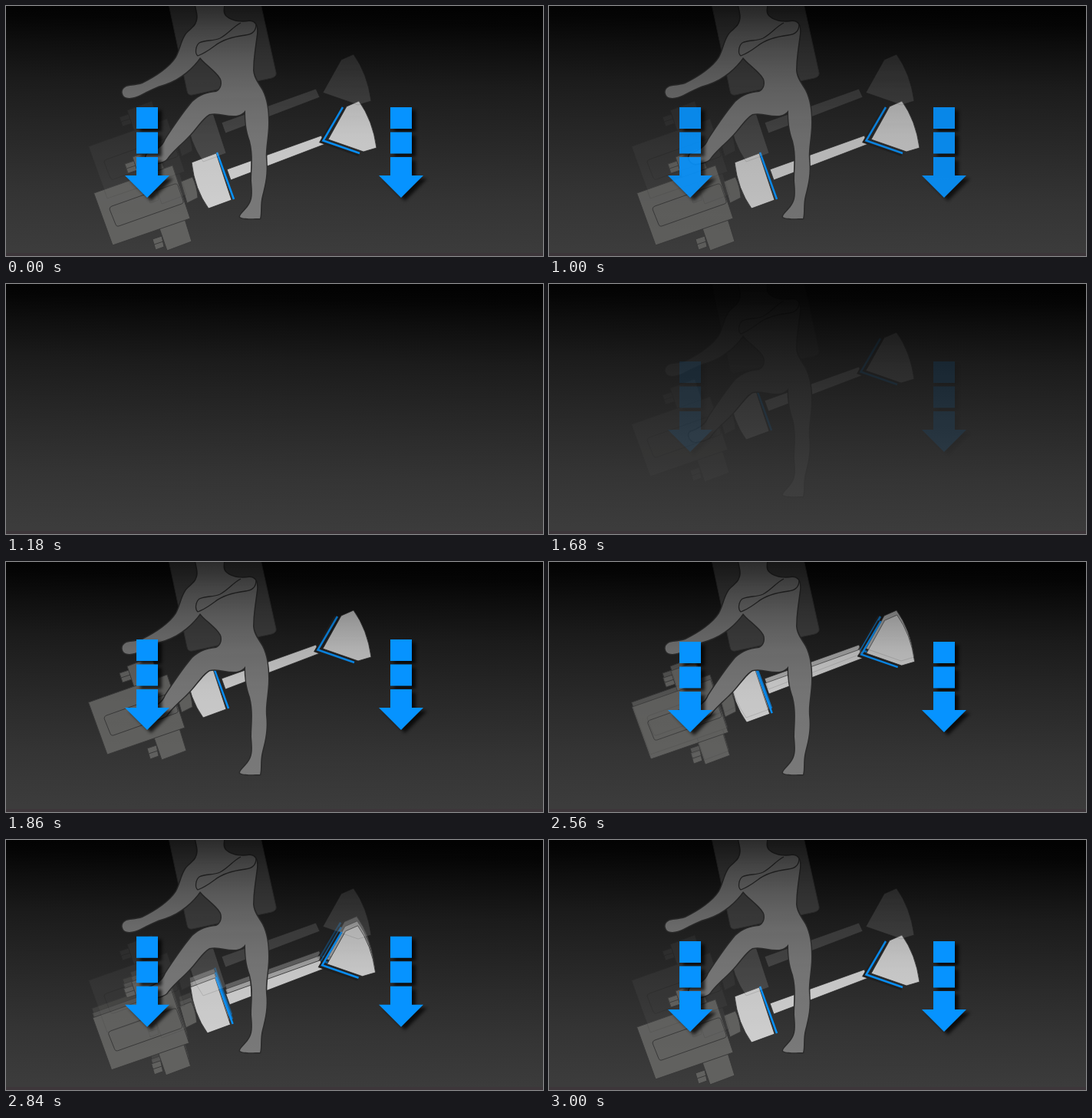
These frames come from a looping animation (700x326 px, 5 s). An HTML page:

```html
<!DOCTYPE html>
<html lang="en">
<head>
<meta charset="utf-8">
<title>Press movement</title>
<style>
  html, body { margin: 0; width: 100%; height: 100%; overflow: hidden; background: #1c1c1c; }
  svg { display: block; width: 100%; height: 100%; }
</style>
</head>
<body>
<svg viewBox="0 0 700 326" preserveAspectRatio="none">
  <defs>
    <linearGradient id="wall" gradientUnits="userSpaceOnUse" x1="350" y1="0" x2="344.5" y2="322">
      <stop offset="0" stop-color="#020202"/>
      <stop offset=".06" stop-color="#050505"/>
      <stop offset=".155" stop-color="#0e0e0e"/>
      <stop offset=".31" stop-color="#1b1b1b"/>
      <stop offset=".47" stop-color="#242424"/>
      <stop offset=".62" stop-color="#2c2c2c"/>
      <stop offset=".78" stop-color="#343434"/>
      <stop offset="1" stop-color="#3c3c3c"/>
    </linearGradient>
    <linearGradient id="light" gradientUnits="userSpaceOnUse" x1="0" y1="0" x2="0" y2="280">
      <stop offset="0" stop-color="#595959"/>
      <stop offset=".12" stop-color="#878787"/>
      <stop offset=".26" stop-color="#b0b0b0"/>
      <stop offset=".4" stop-color="#d2d2d2"/>
      <stop offset=".6" stop-color="#efefef"/>
      <stop offset="1" stop-color="#fff"/>
    </linearGradient>
    <mask id="dim" maskUnits="userSpaceOnUse" x="0" y="0" width="700" height="326" style="mask-type:luminance" color-interpolation="sRGB">
      <rect width="700" height="326" fill="url(#light)"/>
    </mask>
    <filter id="soft" x="-30%" y="-20%" width="170%" height="150%">
      <feGaussianBlur stdDeviation="2.2"/>
    </filter>

    <!-- lever, weights and drive unit, at the upper position -->
    <g id="rig">
      <g fill="#61615f" stroke="#393939" stroke-width="1" stroke-linejoin="round">
        <path d="M148 145L160 141L164 153L152 157ZM150 151L162 147"/>
        <path d="M158 136L190 124L199 151L167 163Z"/>
        <path d="M184 243L196 239L199 253L188 257ZM186 250L198 246"/>
        <path d="M193 229L226 217L235 246L203 258Z"/>
        <path d="M221 168L236 162Q242 174 243 189L229 196Z"/>
        <path d="M107.5 183L210 147L233 216L132 251Z"/>
        <path d="M131 200L213 171Q216 170 217 173L224 193Q225 196 222 197L140 226Q137 227 136 224L128 204Q128 201 131 200Z"/>
      </g>
      <g fill="#cfcfcf" stroke="#2a2a2a" stroke-width=".8">
        <path d="M281 152L404 108L409 119L286 166Z"/>
        <path d="M235 143L267 131L287 192L257 203Q239 178 235 143Z"/>
        <path d="M413 113L437 70L453 63Q471 88 476 124L459 129Z"/>
      </g>
    </g>
    <g id="edges" fill="none">
      <path d="M430 71L404 116L453 133" stroke="#202020" stroke-width="4"/>
      <path d="M268 130L290 191M432 71L406.500 114.500L454 131" stroke="#0693ff" stroke-width="2.500"/>
    </g>
    <g id="full"><use href="#rig"/><use href="#edges"/></g>

    <path id="arrow" d="M170 101h28v28h-28zM170 133.500h28v28h-28zM170 166h28v24h15L184 219L155 190h15z"/>
    <g id="pointer">
      <use href="#arrow" x="5" y="4" opacity=".75" filter="url(#soft)"/>
      <use href="#arrow" fill="#0693ff"/>
    </g>
  </defs>

  <rect width="700" height="326" fill="url(#wall)"/>
  <rect y="322" width="700" height="4" fill="#3d363a"/>

  <g id="scene" mask="url(#dim)">
    <path d="M210 -12L236 111Q237 117 243 116L346 94Q353 92 352 87L330 -12Z" fill="#3f3f3f" stroke="#303030"/>
    <use id="trail2" href="#full"/>
    <use id="trail1" href="#full"/>
    <use id="current" href="#full"/>
    <use id="ghost" href="#rig" opacity=".19"/>
    <g stroke="#2b2b2b" stroke-linejoin="round">
      <path fill="#797979" stroke-width="3" paint-order="stroke" d="M247 -2C248 6 252 14 248 22C246 28 238 32 234 38
        C228 48 227 58 222 67C214 80 196 92 178 101C170 104 163 103 157 105C151 108 150 113 154 118
        C160 122 168 119 175 116C186 110 196 105 207 102C228 95 244 80 253 67C261 77 274 84 280 95
        C283 103 279 110 274 112C262 113 253 116 243 125C232 138 219 157 208 174C204 184 196 189 184 193
        C180 198 184 205 191 206C198 205 207 203 210 199C216 190 226 182 236 172C248 160 255 147 265 141
        C276 138 288 144 300 143C306 142 310 139 312 136C312 150 313 162 318 176C323 195 320 212 320 228
        C321 240 322 250 318 257C315 264 305 271 305 275C308 278 322 277 331 277C333 270 331 258 334 247
        C338 232 341 218 339 200C338 185 342 170 342 152C342 135 340 122 334 110C329 101 323 95 322 84
        C322 68 325 52 327 36C328 26 325 20 317 20C306 22 293 20 286 13C282 8 284 4 284 -2Z"/>
      <path fill="none" stroke-width="1.300" d="M326 24C326 32 322 37 312 38C296 40 282 44 272 52C264 58 258 62 250 65
        C246 62 247 52 252 48C260 44 270 46 279 42C290 36 296 27 306 22"/>
    </g>
  </g>

  <g id="arrows">
    <use href="#pointer"/>
    <use href="#pointer" x="331"/>
  </g>
</svg>
<script>
  const LOOP = 5000, MOVE_STEPS = 10;
  const RIG_SHIFT = [7, 61], ARROW_SHIFT = [0, 31];
  const el = id => document.getElementById(id);
  const [scene, arrows, current, trail1, trail2, ghost] =
    ['scene', 'arrows', 'current', 'trail1', 'trail2', 'ghost'].map(el);

  // Number of steps taken since start, counting the one made at start itself.
  const stepsAt = (t, start, gap, count) =>
    t < start ? 0 : Math.min(count, Math.floor((t - start) / gap) + 1);

  const progress = step => Math.max(0, Math.min(1, step / MOVE_STEPS));

  function place(node, [dx, dy], p) {
    node.setAttribute('transform', `translate(${dx * p} ${dy * p})`);
  }

  function show(node, opacity) {
    node.setAttribute('opacity', opacity);
    node.setAttribute('display', opacity > 0 ? 'inline' : 'none');
  }

  function draw(t) {
    const lowered = t < 1180;
    const step = lowered ? 12 : stepsAt(t, 2560, 40, 12);
    const alpha = lowered
      ? 1 - stepsAt(t, 1000, 20, 10) / 10
      : stepsAt(t, 1680, 20, 10) / 10;
    const moving = step > 0 && step < 12;

    show(scene, alpha);
    show(arrows, alpha);
    place(current, RIG_SHIFT, progress(step));
    place(trail1, RIG_SHIFT, progress(step - 1));
    place(trail2, RIG_SHIFT, progress(step - 2));
    place(arrows, ARROW_SHIFT, progress(step));
    show(trail1, moving ? 0.6 : 0);
    show(trail2, moving ? 0.35 : 0);
    show(ghost, step > 0 ? 0.19 : 0);
  }

  const start = performance.now();
  function tick() {
    draw((performance.now() - start) % LOOP);
    requestAnimationFrame(tick);
  }
  tick();
</script>
</body>
</html>
```
